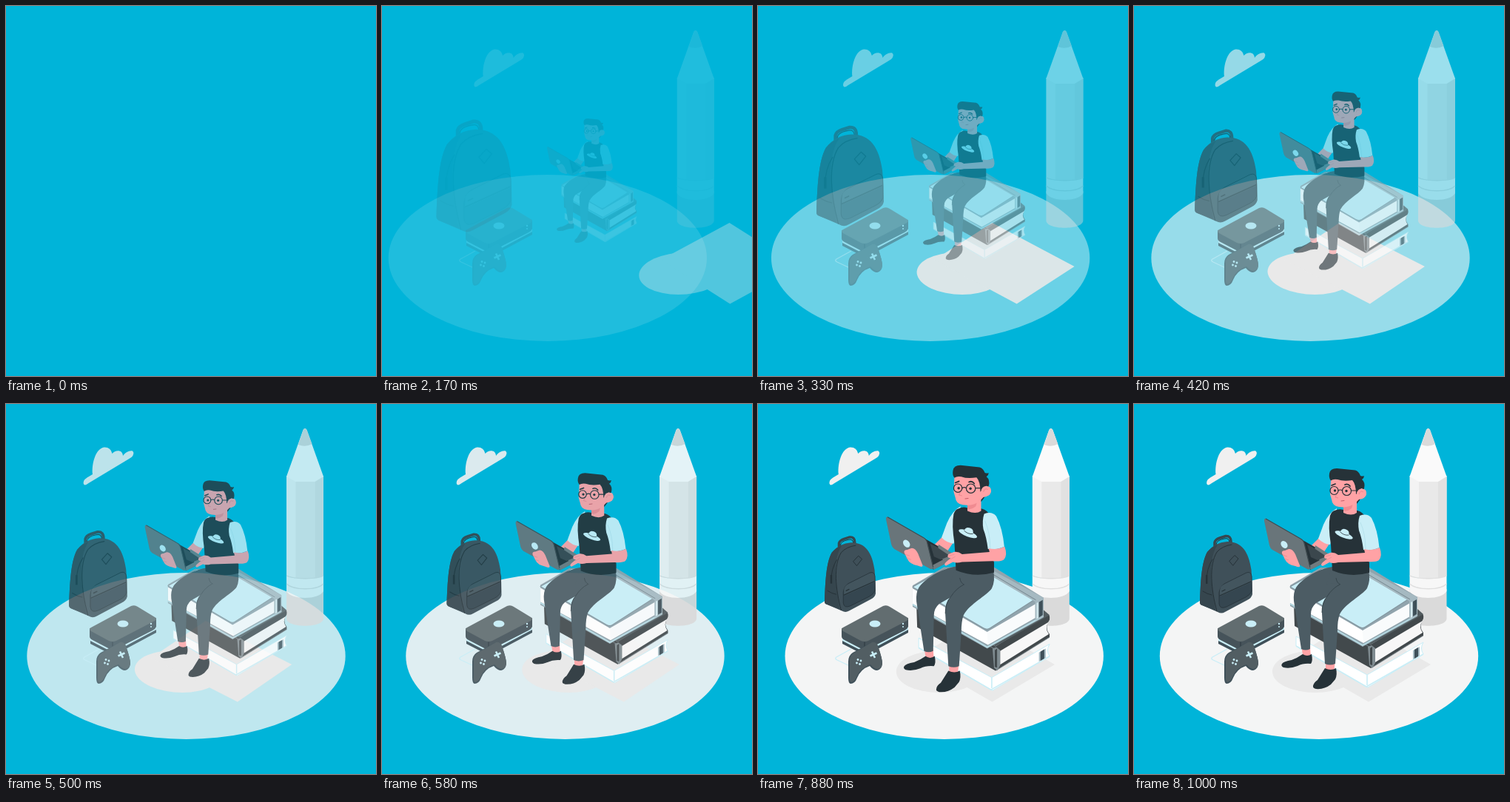
Animation, 500 px wide and 500 px high, one loop 1040 ms. Source, as an HTML page:

```html
<!DOCTYPE html>
<html lang="en">
<head>
<meta charset="utf-8">
<title>Student with laptop</title>
<style>
html, body { margin: 0; width: 100%; height: 100%; overflow: hidden; background: #00b4d9; }
svg { display: block; width: 100vw; height: 100vh; }
.ink { fill: #263238; }
.slate { fill: #3f5059; }
.steel { fill: #4c5c64; }
.ice { fill: #c9eef7; }
.skin { fill: #ffa2a5; }
.line { fill: none; stroke: #263238; stroke-linecap: round; stroke-linejoin: round; }
</style>
</head>
<body>
<svg viewBox="0 0 500 500">
  <g id="floor"><ellipse cx="250" cy="340.5" rx="215.2" ry="112.5" fill="#f4f5f5"/></g>

  <g id="shadow" fill="#e9e9e9">
    <ellipse cx="245" cy="361.5" rx="58" ry="28.5"/>
    <path d="M297 293L401 352L317 402.500L213 343Z"/>
  </g>

  <g id="cloud">
    <path fill="#f0f0f0" d="M99 109Q96 104 103 99.500L110.500 95C109 80 115 60 126 58.500Q135 58 137 67C141 62 151 61 151.500 70C154 66 160 62.500 164.500 63.500Q168 67 163 72L159 74.500L105 107Q101 110.500 99 109Z"/>
  </g>

  <g id="pencil">
    <path fill="#dadada" d="M372.500 250H422.500V290C422 303 373 303 372.500 290Z"/>
    <path fill="#f3f3f3" d="M372.500 97H422.500V232Q412 240 385 236L372.500 232Z"/>
    <path fill="#e9e9e9" d="M385 103H411V237H385Z"/>
    <path fill="#e1e1e1" d="M411 103L422.500 97V232L411 237Z"/>
    <path fill="#fafafa" d="M395 35Q397.500 31 400 35L422.500 98L411 105H385L372.500 98Z"/>
    <path fill="#dadada" d="M395 35Q397.500 31 400 35L407 54Q398 59 388.500 55Z"/>
    <path fill="#f7f7f7" d="M372.500 232Q397 241 422.500 232V253C416 265 379 265 372.500 253Z"/>
    <path fill="none" stroke="#dfdfdf" stroke-width="1.300" d="M372.500 232C382 237 414 237 422.500 232M372.500 243C382 252 414 252 422.500 243"/>
  </g>

  <g id="backpack">
    <path class="line" style="stroke:#37474f" stroke-width="3.500" d="M109 192V187Q110 183 116 181L124 178.500Q131 178 131 186V190"/>
    <path class="line" d="M111 190Q111 184 122 182Q129 180 129 188"/>
    <path class="slate" d="M89 268C90 242 91 214 99 200Q109 187 126 186C146 186 155 200 158.500 224Q160 240 160 257Q159 262 153 265L123 281Q118 284 113 281L92 272Q89 271 89 268Z"/>
    <path fill="#36464e" d="M89 268C90 242 91 214 99 200Q105 193 113 190C104 203 103 223 105 245L110 279L92 272Q89 271 89 268Z"/>
    <path class="line" d="M112 280C104 250 101 218 112 200Q119 192 132 190M106 210Q98 222 98 240M93 253Q99 257 105 258"/>
    <path fill="#354650" stroke="#263238" stroke-width=".8" d="M115 255Q116 247 122 243L152 228Q158 226 159 233V253Q157 258 151 261L125 274Q116 278 115 270Z"/>
    <path fill="#43555e" d="M116 252Q116 246 123 243L151 229Q158 226 158.500 233V241L116 260Z"/>
    <path class="line" stroke-width="1.300" d="M116 259L158 240M119 253L123 251"/>
    <path class="line" d="M129 212L136 204.500L141 209L134 218Z"/>
    <path class="ink" d="M97 231h2.500v12h-2.500Z"/>
  </g>

  <g id="console">
    <path fill="none" stroke="#c9eef7" stroke-width="1.300" d="M126 331L106 342Q103 344 107 346L124 354"/>
    <path class="slate" d="M114 319L174 291L203 304V309L145 340L114 324Z"/>
    <path class="ice" d="M114 317L174 289L203 302V305L145 336L114 320Z"/>
    <path fill="#46535a" d="M113 303L143 319L203 289V301Q202 304 198 306L149 331Q145 334 140 331L117 319Q113 317 113 314Z"/>
    <path fill="#626d70" d="M115 302L169 273Q174 271 178 274L201 288Q205 290 201 293L149 320Q144 322 139 320L115 307Q111 304 115 302Z"/>
    <path class="line" d="M144 322V331" stroke-width=".8"/>
    <ellipse class="ice" cx="158" cy="297" rx="7.500" ry="4.500"/>
    <g class="ice"><circle cx="196" cy="297" r="1.200"/><circle cx="196" cy="301" r="1"/></g>
    <path class="slate" d="M122 348Q122 340 128 336L154 322Q160 321 162 327Q168 344 168 351Q167 359 161 360Q156 360 151 354Q139 358 134 370Q131 378 125 378Q122 377 122 370Z"/>
    <path fill="#525e63" d="M124 348Q123 341 130 336L154 322Q160 321 162 327Q168 344 168 351Q167 357 162 358Q157 358 152 352Q139 356 134 367Q131 375 126 376Q123 374 124 366Z"/>
    <path stroke="#c9eef7" stroke-width="2.500" d="M151.500 340.500L160.500 336.500M154 334.500L158 343"/>
    <g class="ice"><circle cx="133.500" cy="350" r="1.400"/><circle cx="135" cy="345.500" r="1.400"/><circle cx="139" cy="347" r="1.400"/><circle cx="137.500" cy="351.500" r="1.400"/></g>
  </g>

  <g id="student">
    <g id="books" stroke-linejoin="round">
      <path fill="#fff" stroke="#c9eef7" d="M219 314L315 366L391 322Q386 330 391 338L316 383L219 327Z"/>
      <path fill="none" stroke="#c9eef7" stroke-width="1.600" d="M219 327L314 382L391 338M315 366V380"/>
      <path fill="#a5b9c1" d="M377 333L386 328V340L377 345Z"/>
      <path class="slate" d="M379 332L384 329V341L379 344Z"/>

      <path fill="#42494c" d="M216 270L320 325L388 283Q392 283 391 290Q384 301 391 309V313L320 357L217 300Z"/>
      <path fill="#525c60" d="M216 270L320 325L391 284L383 277L309 318L216 264Z"/>
      <path fill="#f7f7f7" d="M326 331L390 293Q384 301 390 309L326 349Z"/>
      <path fill="#7f8b90" d="M316 328L321 326L326 330V350L322 357L318 353Z"/>
      <path fill="#42494c" d="M319 330L322 328V353L319 352Z"/>
      <path fill="none" stroke="#7d898e" stroke-width=".9" d="M218 274L318 328M322 356L391 313"/>

      <path fill="#91a4ad" d="M211 245L252 221H318L383 261V287L309 328L211 273Z"/>
      <path fill="#fff" d="M211 249L309 306L373 269V287L310 323L211 269Z"/>
      <path fill="#e7eff1" d="M309 306L373 269V287L310 323Z" opacity=".25"/>
      <path fill="none" stroke="#b7dce5" stroke-width="2" d="M211 270L309 326L383 285"/>
      <path class="ice" stroke="#83969f" stroke-width="1.200" d="M211 247L255 222L317 230L372 263L313 301Q309 304 304 301Z"/>
      <path fill="#a5b9c1" d="M314 224L383 261L373 267L310 230Z"/>
      <path fill="none" stroke="#71838b" stroke-width=".9" d="M316 230L373 264"/>
      <path fill="#a5b9c1" d="M372 267L383 261V286L372 291Z"/>
      <path class="slate" d="M377 267L382 264V284L377 287Z"/>
      <path fill="#d7edf2" d="M374 268L376 267V288L374 289Z"/>
    </g>

    <g id="legs">
      <path class="skin" d="M226 327L238 328L239 343L229 344ZM259 347H272L270 363L259 362Z"/>
      <path class="ink" d="M200 351Q202 348 213 346Q221 343 228 338Q234 342 240 338Q242 347 239 351Q229 350 221 354Q211 358 202 356Q198 354 200 351Z"/>
      <path class="ink" d="M242 382Q242 377 248 373L258 357Q266 361 273 357Q275 366 272 372L266 379Q257 386 246 385Q242 384 242 382Z"/>
      <path class="steel" d="M268 220C248 223 226 237 219 248Q215 255 216 266L226 331Q232 334 238 331L239 284Q239 275 246 269L285 247V222Z"/>
      <path class="steel" d="M270 222L317 225Q320 238 315 249C308 259 286 269 278 284Q275 292 275 306L272 351Q265 354 258 351L254 283Q253 267 261 260L279 244Q269 241 260 244L267 222Z"/>
      <path fill="none" stroke="#35434a" stroke-width=".9" d="M278 244Q268 249 261 260Q254 268 254 282M279 244Q274 242 273 235"/>
    </g>

    <path class="skin" d="M250 181L264 189L256 201L240 191Z"/>
    <path class="ice" d="M274 141Q263 147 256 163L249 182Q256 189 265 190L273 165Z"/>
    <path class="ink" d="M271 144Q277 141 283 143L302 144Q309 146 313 153Q315 164 313 180L318 215V228Q292 235 268 225L266 190Q262 165 265 151Q267 145 271 144Z"/>
    <path class="skin" d="M283 131H301V147Q294 152 283 147Z"/>
    <path fill="#f08b91" d="M283 138Q291 139 297 131L294 141Q288 146 283 144Z"/>
    <path class="ice" d="M305 151Q315 147 321 154Q329 169 331.500 194Q320 199 310 197Q308 181 304 171Q302 160 305 151Z"/>
    <path fill="none" stroke="#a9dbe6" stroke-width=".6" d="M306 160Q313 176 313 196"/>
    <g transform="rotate(21 284 176)">
      <path class="ice" d="M278 175Q278 169 284 169Q290 169 290 175Z"/>
      <ellipse class="ice" cx="284" cy="177" rx="12.800" ry="3.800"/>
      <path class="line" stroke-width=".7" d="M278 175Q284 178 290 175"/>
    </g>

    <path class="ink" d="M228 184L267 206Q268 210 264 211L238 224Z"/>
    <path fill="#707b7f" d="M245 191L267 205Q268 209 264 211L239 224L236 219L251 211L243 205Z"/>
    <path fill="#3b474d" d="M234 190L242 194L260 206L248 211L239 207Z"/>
    <path fill="#69757a" d="M178 155L225 182Q229 184 230 188L238 221Q238 225 234 223L187 197Q184 195 183 191L176 158Q176 154 178 155Z"/>
    <path fill="none" stroke="#3f4b50" stroke-width="1.200" d="M178 155L225 182Q229 184 230 188L238 221"/>
    <ellipse class="ice" cx="203" cy="190" rx="4" ry="5.500" transform="rotate(-38 203 190)"/>
    <path class="skin" d="M200 202Q199 198 204 198L209 196Q214 195 218 203L224 218Q225 222 218 219Q207 217 204 210Z"/>
    <path fill="none" stroke="#ee878e" stroke-width=".7" d="M201 204L207 206M203 209L209 211"/>
    <path class="skin" d="M311 196Q321 199 332 194Q336 205 331 211Q327 214 316 213L276 214Q269 216 264 214L255 219Q251 218 255 214L261 209Q255 209 258 204L265 201Q271 200 276 204L312 201Z"/>
    <path fill="none" stroke="#ee878e" stroke-width=".7" d="M260 211L267 207M259 206L266 204"/>

    <path class="ink" d="M301 120L311 112Q310 125 301 135Z"/>
    <path class="skin" d="M266 101L294 99L309 115Q314 114 314 121Q313 128 304 129L299 134Q290 141 277 139Q268 138 267 129L265 122Z"/>
    <path class="ink" d="M266 103.500Q263 100 264 94Q265 87 274 87L299 89.500Q304 91 306 97Q309 98 311 97Q311 100 308 102Q313 106 311 114Q306 113 303 119L300 122Q300 108 295 103Q283 105 275 102Q269 101 266 103.500Z"/>
    <circle class="skin" cx="307.500" cy="121" r="6.500"/>
    <path fill="none" stroke="#ee878e" d="M304 122Q306 116 310 119M275 119L272 126L276 127"/>
    <g class="line" stroke-width="1.200">
      <circle cx="270.500" cy="117" r="5.500"/><circle cx="287.500" cy="117.500" r="6"/>
      <path d="M276 117Q279 115 281.500 117M293.500 117L302 117"/>
      <path stroke-width="1.700" d="M267 110L272 108M285 109Q289 107 292 111"/>
      <path stroke="#c65c67" stroke-width="1" d="M280 131L284 130.500"/>
    </g>
    <circle class="ink" cx="271.500" cy="117" r="1.700"/><circle class="ink" cx="287" cy="117.500" r="1.700"/>
  </g>
</svg>
<script>
const LOOP = 1040, FPS = 24;
const node = id => document.getElementById(id);
const parts = Object.fromEntries(
  ["floor", "shadow", "cloud", "pencil", "backpack", "console", "student"].map(id => [id, node(id)]));

const bezier = (a, b, s) => 3 * a * s * (1 - s) ** 2 + 3 * b * s * s * (1 - s) + s ** 3;

// Cubic bezier easing with overshoot, solved by bisection.
function ease(x) {
  if (x <= 0) return 0;
  if (x >= 1) return 1;
  let low = 0, high = 1;
  for (let i = 0; i < 24; i++) {
    const mid = (low + high) / 2;
    if (bezier(.36, .5, mid) < x) low = mid; else high = mid;
  }
  return bezier(-.01, 1.38, low);
}

function place(name, opacity, transform = "") {
  parts[name].setAttribute("opacity", Math.min(1, Math.max(0, opacity)));
  parts[name].setAttribute("transform", transform);
}

const slide = (dx, p) => `translate(${dx * (1 - p)} 0)`;
const zoom = (x, y, from, p) =>
  `translate(${x} ${y}) scale(${from + (1 - from) * p}) translate(${-x} ${-y})`;

// The shadow rushes in, then its slant swings to rest.
function placeShadow(x) {
  const slant = degrees => Math.tan(degrees * Math.PI / 180);
  const stops = [[0, -20], [.6, 10], [.8, -2], [1, 0]];
  const i = x < .6 ? 0 : x < .8 ? 1 : 2;
  const [[start, from], [end, to]] = [stops[i], stops[i + 1]];
  const p = ease((x - start) / (end - start));
  const skew = slant(from) + (slant(to) - slant(from)) * p;
  const dx = i ? 0 : 250 * (1 - p);
  place("shadow", i ? 1 : p, `matrix(1 0 ${skew} 1 ${dx - skew * 347.5} 0)`);
}

function draw(time) {
  let step = 24;
  while (Math.round(step * 100 / FPS) * 10 > time) step--;
  const x = step < 2 ? 0 : Math.min(1, (step + .5) / FPS);
  const p = ease(x);
  place("floor", p, slide(-30, p));
  placeShadow(x);
  place("cloud", p, slide(30, p));
  place("pencil", p, slide(30, p));
  place("backpack", p, zoom(124.5, 230, 1.5, p));
  place("console", p);
  place("student", p, zoom(283.5, 236, .5, p));
}

const begin = performance.now();
function tick() {
  draw((performance.now() - begin) % LOOP);
  requestAnimationFrame(tick);
}
draw(0);
requestAnimationFrame(tick);
</script>
</body>
</html>
```
